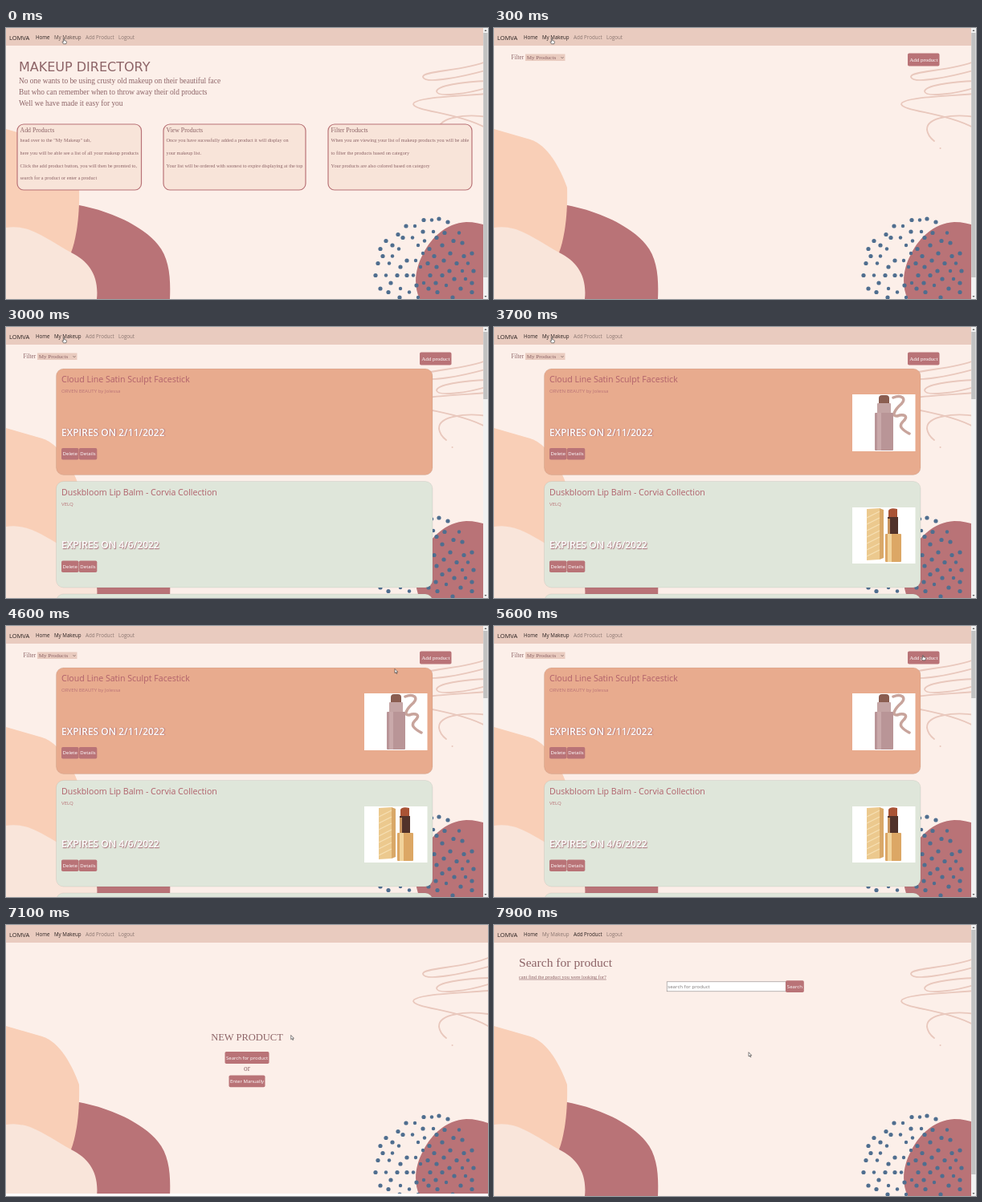
Write an HTML page that moves like this. It is 600 by 338 pixels and loops after 8000 ms.

```html
<!DOCTYPE html>
<html lang="en">
<head>
<meta charset="utf-8">
<title>Makeup directory</title>
<style>
  html, body { margin: 0; width: 100%; height: 100%; overflow: hidden; background: #fff; }
  svg { display: block; width: 100vw; height: 100vh; }
  text { white-space: pre; }
  .sans { font-family: "Open Sans", "Noto Sans", sans-serif; }
  .serif { font-family: "Liberation Serif", "Noto Serif", serif; }
  .wide { font-family: "DejaVu Sans", sans-serif; }
</style>
</head>
<body>
<svg id="stage" viewBox="0 0 600 338">
  <rect width="600" height="338" fill="#fcefe9"/>
  <g id="backdrop">
    <path fill="#b97377" d="M80 219L91 221C133 229 171 248 189 270C204 288 205 313 204 338H70Z"/>
    <path fill="#f9cfb7" d="M0 126L45 139C67 146 82 174 91 199C92 231 88 262 81 280L0 300Z"/>
    <path fill="#f9e5da" d="M0 249C28 245 44 259 81 280C103 291 116 309 113 338H0Z"/>
    <path fill="#b97377" d="M515 338C507 321 509 301 519 282C531 258 551 243 573 242C583 242 592 244 600 247V338Z"/>
    <g id="dots" fill="#4f6e8f"/>
    <g fill="none" stroke="#e9c8bd" stroke-width="1.8" stroke-linecap="round">
      <path d="M600 41C570 54 518 53 519 61C521 71 571 60 600 52"/>
      <path d="M600 66C567 67 537 72 536 79C537 87 575 82 600 74"/>
      <path d="M600 82C565 85 508 86 507 95C509 104 566 106 600 126"/>
      <path d="M600 111C572 107 538 111 539 127C540 134 544 138 548 141"/>
      <path d="M555.5 150h.2"/>
    </g>
  </g>
  <g id="home"></g>
  <g id="filter"></g>
  <g id="list"></g>
  <g id="add"></g>
  <g id="search"></g>
  <g id="nav"></g>
  <g id="scrollbar">
    <rect x="594" width="6" height="338" fill="#f1f1f1"/>
    <rect id="thumb" x="594.2" y="6" width="5.3" fill="#c1c1c1"/>
    <path d="M595.5 4l1.5-2l1.5 2zM595.5 334l1.5 2l1.5-2z" fill="#606060"/>
  </g>
  <g id="cursor" stroke-linejoin="round">
    <path id="arrow" d="M0 0V5.2L1.2 4.2L2.1 6.1L3 5.7L2.1 3.8H3.7Z" fill="#fff" stroke="#222" stroke-width=".55"/>
    <path id="hand" d="M-.6 .3Q0-.5.6.3V2.2L2.8 2.8Q3.5 3 3.4 3.9L2.8 6.3H-.5L-2.1 3.8Q-1.8 3-.6 4Z" fill="#fff" stroke="#222" stroke-width=".55"/>
  </g>
</svg>
<script>
const LOOP = 8000;
const ROSE = "#b97377", INK = "#8d6467", TITLE = "#b0616b", SAND = "#e9cbbf";
const $ = id => document.getElementById(id);

function make(parent, tag, attrs, content) {
  const node = document.createElementNS("http://www.w3.org/2000/svg", tag);
  for (const key in attrs) node.setAttribute(key, attrs[key]);
  if (content) node.textContent = content;
  parent.appendChild(node);
  return node;
}
const text = (parent, x, y, size, content, fill = INK, family = "serif", more = {}) =>
  make(parent, "text", { x, y, "font-size": size, fill, class: family, ...more }, content);
const box = (parent, x, y, width, height, fill, rx = 0, more = {}) =>
  make(parent, "rect", { x, y, width, height, fill, rx, ...more });
const shape = (parent, d, fill, more = {}) => make(parent, "path", { d, fill, ...more });

function button(parent, x, y, width, height, label, size = 6.1, family = "sans") {
  box(parent, x, y, width, height, ROSE, 1.8);
  text(parent, x + width / 2, y + height / 2 + size * .36, size, label, "#fff", family,
    { "text-anchor": "middle" });
}

// Dot centres as x values per row
const dotRows = {
  238: [539], 239.5: [520, 530], 242: [550], 247: [498, 509], 254: [519, 532], 255.5: [546, 564],
  257.5: [488], 261.5: [494, 506, 536], 265.5: [473, 521, 557], 268: [568], 271: [481, 513, 543],
  275.5: [466, 489, 527], 281: [553, 519, 580], 284.5: [469, 481, 533, 570], 290: [499, 510, 545],
  293.5: [463, 477, 525, 561, 575], 298: [491, 516, 536], 303: [552, 568, 582],
  308.5: [460, 473, 487, 499, 507, 528, 543], 313: [558, 572], 318: [479, 520, 535, 580],
  321: [511, 548], 325: [466, 491, 526, 566], 329.5: [476, 502, 537, 580], 336: [490, 513, 556]
};
for (const y in dotRows) dotRows[y].forEach((x, i) =>
  make($("dots"), "circle", { cx: x, cy: y, r: i % 3 === 1 ? 2.2 : 2.6 }));

// Navigation
box($("nav"), 0, 0, 600, 22, SAND);
text($("nav"), 4, 14.5, 7.5, "LOMVA", "#2b2221", "sans");
const links = [[37, "Home"], [60, "My Makeup"], [99, "Add Product"], [140, "Logout"]]
  .map(([x, label]) => text($("nav"), x, 13.8, 6.2, label, "#000", "sans"));

// Home page
const home = $("home");
text(home, 16, 53.5, 16, "MAKEUP DIRECTORY", INK, "wide");
["No one wants to be using crusty old makeup on their beautiful face",
 "But who can remember when to throw away their old products",
 "Well we have made it easy for you"]
  .forEach((line, i) => text(home, 16, 68.5 + i * 14.3, 9.375, line));
[[14, 154.5, "Add Products", ["head over to the \"My Makeup\" tab,",
   "here you will be able see a list of all your makeup products",
   "Click the add product button, you will then be promted to,",
   "search for a product or enter a product"]],
 [196, 177, "View Products", ["Once you have sucessfully added a product it will display on",
   "your makeup list.",
   "Your list will be ordered with soonest to expire displaying at the top"]],
 [401, 179, "Filter Products", ["When you are viewing your list of makeup products you will be able",
   "to filter the products based on category",
   "Your products are also colored based on category"]]
].forEach(([x, width, title, lines]) => {
  box(home, x, 120, width, 82, "#f8e4d9", 8, { stroke: ROSE, "stroke-width": 1.2 });
  text(home, x + 3.5, 130.3, 7.8, title);
  lines.forEach((line, i) => text(home, x + 3.5, 142.4 + i * 15.6, 6.25, line));
});

// Filter bar
const filter = $("filter");
text(filter, 21.5, 39.3, 7.2, "Filter");
box(filter, 39, 32.5, 49.5, 8.5, SAND);
text(filter, 40.7, 39.3, 7.1, "My Products");
shape(filter, "M83.5 36.2l1.5 1.5l1.5-1.5", "none", { stroke: "#4a3a38", "stroke-width": .6 });
button(filter, 515, 31.6, 39.5, 16, "Add product", 7, "serif");

// Product list
const list = $("list");
function product(y, fill, title, brand, date) {
  box(list, 62.5, y, 468.5, 132.5, fill, 9, { stroke: "#000", "stroke-opacity": .13, "stroke-width": .5 });
  if (!title) return;
  text(list, 69, y + 17.3, 10.6, title, TITLE, "sans", { "font-weight": 500 });
  text(list, 69, y + 30, 6.1, brand, ROSE, "sans");
  text(list, 69, y + 83.8, 12, "EXPIRES ON " + date, "#fff", "sans",
    { "font-weight": 600, style: "text-shadow:.7px .7px 1.2px #a0606a" });
  button(list, 69, y + 99, 21.5, 14.5, "Delete");
  button(list, 90.8, y + 99, 22.5, 14.5, "Details");
}
product(52, "#e8ab8e", "Cloud Line Satin Sculpt Facestick", "ORVEN BEAUTY by Jolessa", "2/11/2022");
product(192.5, "#dfe6da", "Duskbloom Lip Balm - Corvia Collection", "VELQ", "4/6/2022");
product(333, "#dfe6da");

const photoA = make(list, "g", {});
box(photoA, 446, 84, 78.5, 71, "#fff");
shape(photoA, "M497 88C507 84 514 89 507 96C499 103 494 112 502 111C510 108 517 111 509 118C503 124 508 128 517 133",
  "none", { stroke: "#c8a49c", "stroke-width": 3.5, "stroke-linecap": "round" });
box(photoA, 479, 85, 13, 18, "#8a5d50", 4);
box(photoA, 477, 95, 17, 14, "#c4a4a4", 1);
box(photoA, 474, 107, 23, 47, "#b99597", 1);
box(photoA, 477, 107, 5, 47, "#c9a9aa");

const photoB = make(list, "g", {});
box(photoB, 446, 225, 78.5, 70, "#fff");
shape(photoB, "M464 227L480 226V290L464 291Z", "#ecc98e");
shape(photoB, "M480 226L485 228V288L480 290Z", "#d9a868");
for (let i = 0; i < 7; i++)
  shape(photoB, `M464 ${238 + i * 8}L480 ${230 + i * 8}`, "none", { stroke: "#f6dfb3", "stroke-width": 1.3 });
shape(photoB, "M491 239V229Q493 225 502 227V239Z", "#a95335");
box(photoB, 490, 237, 13, 22, "#51322a");
box(photoB, 490, 239, 3, 19, "#c7925d");
box(photoB, 487, 258, 20, 35, "#dca765", 1);
box(photoB, 490, 258, 5, 35, "#f1d39b");

// New product page
const add = $("add");
const centered = { "text-anchor": "middle" };
text(add, 300, 143.8, 12.5, "NEW PRODUCT", INK, "serif", centered);
button(add, 272.5, 158, 55, 15, "Search for product", 6);
text(add, 300, 182, 9.375, "or", INK, "serif", centered);
button(add, 277.5, 187.5, 45, 14.7, "Enter Manually", 6);
box(add, 0, 335, 600, 3, "#fff");

// Search page
const search = $("search");
text(search, 31, 52.3, 15.6, "Search for product");
text(search, 31, 66.7, 6.25, "cant find the product you were looking for?", INK, "serif",
  { "text-decoration": "underline" });
box(search, 215.2, 70.8, 148, 12, "#fff", 0, { stroke: "#8c8585", "stroke-width": .6 });
text(search, 216.3, 79.2, 6.1, "search for product", "#7d7878", "sans");
button(search, 363, 69.3, 22.8, 14.7, "Search");

// Pointer stops: time, x, y
const stops = [[0, 72, 13.5], [3850, 72, 13.5], [4600, 484, 53.5], [4750, 486, 52],
  [5400, 534, 36.5], [6550, 534, 36.5], [7300, 317, 158.7], [LOOP, 317, 158.7]];
function pointer(t) {
  const i = Math.max(1, stops.findIndex(stop => stop[0] > t));
  const [t0, x0, y0] = stops[i - 1], [t1, x1, y1] = stops[i];
  const u = (t - t0) / (t1 - t0), e = u * u * (3 - 2 * u);
  return [x0 + (x1 - x0) * e, y0 + (y1 - y0) * e];
}

const show = (node, on) => node.setAttribute("display", on ? "inline" : "none");
const inside = (x, y, left, top, right, bottom) => x > left && x < right && y > top && y < bottom;

function render(t) {
  const page = t < 100 ? "home" : t < 3000 ? "filter" : t < 5900 ? "list" : t < 7700 ? "add" : "search";
  for (const id of ["home", "list", "add", "search"]) show($(id), page === id);
  show($("filter"), page === "filter" || page === "list");
  show(photoA, t >= 3200);
  show(photoB, t >= 3300);
  show($("scrollbar"), page !== "add");
  $("thumb").setAttribute("height", page === "list" ? 84 : 305);

  const active = page === "search" ? 2 : page === "home" ? -1 : 1;
  const [x, y] = pointer(t);
  links.forEach((link, i) => {
    const hovered = i === 1 && inside(x, y, 58, 5, 95, 18);
    link.setAttribute("fill", i === 0 || i === active ? "#2b2221" : hovered ? "#5f4f4b" : "#8b7771");
  });

  const onLink = inside(x, y, 37, 5, 160, 18);
  const onButton = page === "list" ? inside(x, y, 515, 32, 554, 47)
    : page === "add" && inside(x, y, 272, 158, 327, 173);
  show($("hand"), onLink || onButton);
  show($("arrow"), !(onLink || onButton));
  $("cursor").setAttribute("transform", `translate(${x} ${y})`);
}

const start = performance.now();
function tick() {
  render((performance.now() - start) % LOOP);
  requestAnimationFrame(tick);
}
tick();
</script>
</body>
</html>
```
